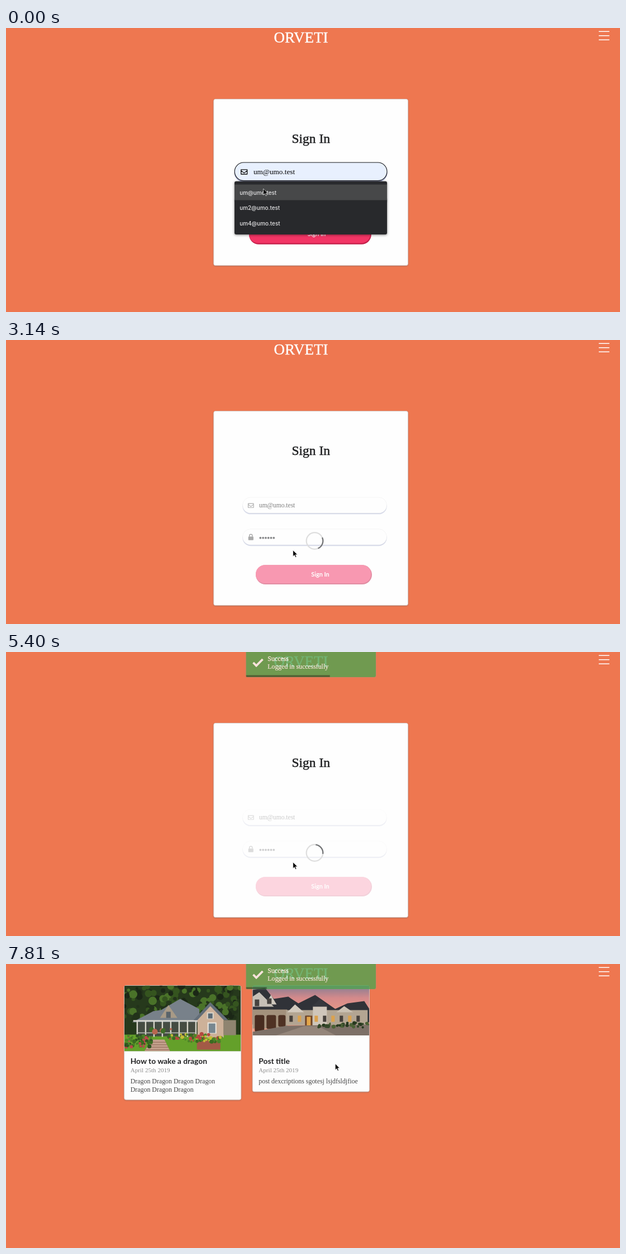
Animation of 1099x509 px, one loop 8000 ms. Source, as an HTML page:

```html
<!DOCTYPE html>
<html lang="en">
<head>
<meta charset="utf-8">
<title>Sign in</title>
<style>
html, body { margin: 0; width: 100%; height: 100%; overflow: hidden; background: #ee7750; }
svg { display: block; width: 1099px; height: 509px; }
text { white-space: pre; }
.serif { font-family: "Liberation Serif", serif; }
.lato { font-family: Lato, sans-serif; font-weight: 700; }
.ui { font-family: Inter, sans-serif; }
.mid { text-anchor: middle; }
.card { stroke: #d4d4d5; stroke-width: .8px; filter: drop-shadow(0 1px 1px rgba(120, 100, 95, .5)); }
.field { filter: drop-shadow(0 2.2px .6px rgba(95, 110, 170, .55)); }
.menu { filter: drop-shadow(0 1px 2px rgba(0, 0, 0, .5)); }
.toast { filter: drop-shadow(0 0 1.5px rgba(153, 153, 153, .6)); }
</style>
</head>
<body>
<svg id="stage" viewBox="0 0 1099 509"></svg>
<script>
const LOOP = 8000;
const STEPS = [0, 140, 310, 460, 610, 760, 1050, 1200, 1500, 1650, 1800, 1940, 2240, 2390, 2540, 2690,
  2990, 3140, 3290, 3430, 3580, 3730, 3880, 4060, 4210, 4360, 4510, 4660, 4810, 4960, 5110, 5250, 5400,
  5550, 5700, 5850, 6000, 6140, 6290, 6440, 6590, 6740, 6950, 7250, 7480, 7810];
const SUBMIT = 2990, TOAST = 3730, FETCH = 6740, POSTS = 7480;
const MAIL = 'um@umo.test';

const range = n => [...Array(n).keys()];
const repeat = (n, draw) => range(n).map(draw).join('');
const clamp = v => Math.max(0, Math.min(1, v));

// Linear interpolation through [time, value] points
function track(points, t) {
  let i = 1;
  while (i < points.length - 1 && t > points[i][0]) i++;
  const [t0, a] = points[i - 1], [t1, b] = points[i];
  return a + (b - a) * clamp((t - t0) / (t1 - t0));
}

function seeded(seed) {
  return () => (seed = seed * 16807 % 2147483647) / 2147483647;
}

const text = (cls, x, y, size, fill, str, extra = '') =>
  `<text class="${cls}" x="${x}" y="${y}" font-size="${size}" fill="${fill}" ${extra}>${str}</text>`;
const rect = (x, y, w, h, fill, r = 0, extra = '') =>
  `<rect x="${x}" y="${y}" width="${w}" height="${h}" rx="${r}" fill="${fill}" ${extra}/>`;
const circle = (x, y, r, fill, extra = '') =>
  `<circle cx="${x}" cy="${y}" r="${r}" fill="${fill}" ${extra}/>`;
const poly = (points, fill) => `<polygon points="${points}" fill="${fill}"/>`;
const path = (d, fill, extra = '') => `<path d="${d}" fill="${fill}" ${extra}/>`;
const group = (attrs, body) => `<g ${attrs}>${body}</g>`;
const move = (x, y, body) => group(`transform="translate(${x} ${y})"`, body);

function header() {
  return text('serif mid', 528, 25.5, 27, '#fff', 'ORVETI', 'stroke="#fff" stroke-width=".4"') +
    path('M1061 6.3h19M1061 13.8h19M1061 21.2h19', 'none', 'stroke="#fff" stroke-width="1.6"');
}

const envelope =
  path('M-5.5-4h11v8.2h-11zM-5.5-2l5.5 4 5.5-4', 'none', 'stroke="#111" stroke-width="1.3" stroke-linejoin="round"');
const lock = rect(-5.3, -1.2, 10.6, 7.4, '#111', 1.2) +
  path('M-3-1v-2a3 3 0 0 1 6 0v2', 'none', 'stroke="#111" stroke-width="1.6"');

const FOCUSED = { border: '#15161a', iconOpacity: 1 };
const BLURRED = { border: 'rgba(34,36,38,.2)', iconOpacity: .5 };
const DISABLED = { border: 'rgba(34,36,38,.08)', iconOpacity: .7 };

function field(x, y, w, scale, fill, icon, look, content) {
  return move(x, y, group(`transform="scale(${scale})"`,
    rect(0, 0, w / scale, 32.6, fill, 16.3, `class="field" stroke="${look.border}" stroke-width="1.1"`) +
    move(17, 16.8, group(`opacity="${look.iconOpacity}"`, icon)) + content));
}

const mailText = text('serif', 33.8, 21, 13.2, '#000', MAIL);
const dots = n => repeat(n, i => circle(36.6 + i * 5.5, 18.2, 2.2, '#15161a'));
const caret = n => rect(34.6 + n * 5.5, 10.5, 1, 13, '#222');

function button(x, y, w) {
  return rect(x, y, w, 34.8, '#c41f4a', 17.4) +
    rect(x, y, w - 1.6, 32.6, '#f23565', 16.3) +
    text('lato mid', x + w / 2 + 11.5, y + 20.3, 10.9, '#fff', 'Sign In');
}

function mailMenu() {
  const rows = [MAIL, 'um2@umo.test', 'um4@umo.test'];
  return group('class="menu"', rect(409, 274.7, 273, 95.3, '#28292c', 3)) +
    rect(409, 280.5, 273, 28, '#474849') +
    rows.map((row, i) => text('ui', 418.3, 298.6 + i * 27.8, 9.9, '#e6e6e7', row, 'font-weight="500"')).join('');
}

function passwordMenu() {
  return group('class="menu"', rect(409, 326.3, 273, 71.7, '#333638', 3)) +
    rect(409, 326.3, 273, 39.3, '#28292b', 3) + circle(424.5, 346.3, 5, '#4fb9d6') +
    text('ui', 436.5, 350, 9.7, '#9d9ea0', 'No username') +
    text('ui', 418.3, 386.5, 9.6, '#9d9ea0', 'Manage passwords…') +
    repeat(14, i => circle(610.8 + i * 4.65, 347.3, 1.8, '#a0a1a3'));
}

function panel(height) {
  return rect(371.8, 127.6, 347.6, height, '#fefefe', 3, 'class="card"') +
    text('serif mid', 545.7, 206, 23.5, '#1e1f21', 'Sign In', 'stroke="#1e1f21" stroke-width=".5"');
}

function signIn(t) {
  const [mailLook, passwordLook] = t < 610 ? [FOCUSED, BLURRED] : [BLURRED, FOCUSED];
  const cleared = t >= 1200;
  const typed = STEPS.filter(s => s >= 1500 && s <= 2390 && s <= t).length;
  const count = cleared ? typed : 14;
  const selection = t >= 1050 && !cleared ? rect(33.5, 9.5, 77, 16, '#b3d4fc') : '';
  const secret = selection + dots(count) + (cleared ? caret(count) : '');
  return panel(298) +
    field(409.2, 241, 272.8, 1, '#e8f0fe', envelope, mailLook, mailText) +
    field(409.2, 292.5, 272.8, 1, cleared ? '#fff' : '#e8f0fe', lock, passwordLook, secret) +
    button(435, 353, 218.8) +
    (t < 140 ? mailMenu() : '') +
    (t >= 760 && t < 1500 ? passwordMenu() : '');
}

function loadingForm(t) {
  const opacity = track([[2900, 1], [3290, .2]], t);
  const angle = 20 + (t - 3580) / 589 * 360;
  const r = 14.8, a = r * Math.SQRT1_2;
  return panel(348) +
    group(`opacity="${opacity}"`,
      field(423.5, 282, 258, .87, '#fefefe', envelope, DISABLED, mailText) +
      field(423.5, 338.8, 258, .87, '#fefefe', lock, DISABLED, dots(6)) +
      button(447, 403.3, 208)) +
    move(552.5, 360, circle(0, 0, r, 'none', 'stroke="#dedede" stroke-width="2.2"') +
      path(`M${-a} ${-a}A${r} ${r} 0 0 1 ${a} ${-a}`, 'none',
        `stroke="#737476" stroke-width="2.2" transform="rotate(${angle})"`));
}

function loader(t) {
  const s = (t - FETCH) / 1000;
  const ring = (r, width, dash, angle) => circle(0, 0, r, 'none',
    `stroke="#fff" stroke-width="${width}" stroke-dasharray="${dash}" transform="rotate(${angle})"`);
  const bars = repeat(5, i => {
    const phase = s - (i + 1) * .1;
    const dy = phase < 0 ? 0 : 5 - 10 * (1 - Math.abs(1 - 2 * (phase % 1)));
    return rect(-20 + i * 10, -15 + dy, 5, 30, '#fff');
  });
  return move(524, 243.8, group('transform="scale(.77)"',
    ring(47, 6, 14.2472, s * 72) + ring(39, 1.3, 10.0472, -s * 72) + bars));
}

function speckle(n, seed, x, y, w, h, r, colors) {
  const rnd = seeded(seed);
  return repeat(n, i => circle((x + rnd() * w).toFixed(1), (y + rnd() * h).toFixed(1),
    (r * (.5 + rnd())).toFixed(1), colors[i % colors.length]));
}

const cottage =
  rect(0, 0, 209, 118, '#26391c') +
  speckle(130, 7, 0, 0, 209, 60, 5, ['#35541f', '#22321a', '#4a7229', '#1b2716']) +
  rect(0, 88, 209, 30, '#64a02a') +
  poly('14,66 52,46 66,44 100,24 134,42 136,66', '#78818a') +
  poly('64,58 79,35 95,58', '#a89a86') + rect(75, 47, 8, 11, '#59636a') +
  rect(22, 66, 108, 25, '#454c42') +
  repeat(8, i => rect(22 + i * 15, 63, 2.4, 29, '#d8d6cb')) +
  rect(16, 62, 118, 2.6, '#d9d8cf') + rect(22, 84, 105, 1.6, '#b9bcb2') +
  poly('124,62 154,30 186,62', '#626d78') +
  poly('131,62 154,37 178,62 178,93 131,93', '#cdb199') +
  rect(148, 48, 12, 12, '#dcd6cb') + rect(150, 50, 8, 9, '#5b6a75') +
  rect(149, 66, 16, 20, '#ebe7df') + rect(151, 68, 12, 17, '#788790') +
  rect(178, 62, 22, 27, '#8f8470') +
  poly('49,97 72,97 82,118 36,118', '#c4a08c') +
  repeat(4, i => rect(46 - i * 3, 101 + i * 4.5, 29 + i * 5, 1.2, '#97705f')) +
  path('M130 102q22-8 42 0v13h-42z', '#a35a46') +
  speckle(70, 21, 2, 90, 46, 20, 2.4, ['#3a6b20', '#b8484a', '#4c8228', '#2f5420']) +
  speckle(70, 33, 80, 87, 94, 14, 2.4, ['#3a6b20', '#c4bb38', '#4c8228', '#b5483f']) +
  speckle(7, 9, 49, 78, 45, 6, 3.5, ['#3f6c28', '#b8664f']);

const manor =
  rect(0, 0, 209, 90, 'url(#dusk)') +
  poly('0,30 0,8 22,4 38,24 64,20 82,32 112,17 148,42 170,32 200,28 209,42 209,66 0,70', '#303238') +
  poly('0,38 0,20 12,12 38,38', '#c6bfb6') + poly('23,34 33,17 43,34', '#cfc8be') +
  rect(0, 43, 62, 34, '#a3917c') + rect(60, 44, 146, 27, '#b3a592') +
  rect(108, 36, 25, 36, '#cfc6ba') + poly('106,38 121,24 135,38', '#36383e') +
  poly('62,48 76,34 92,48', '#d3cabe') + poly('150,48 164,37 180,48', '#cbc1b3') +
  rect(4, 53, 17, 30, '#482c20', 3) + rect(25, 53, 17, 25, '#4f3224', 3) + rect(46, 53, 13, 21, '#4f3224', 3) +
  repeat(9, i => rect(66 + i * 15, 54, 6, 11, i % 2 ? '#dba24e' : '#46403b')) +
  rect(94, 54, 13, 18, '#6f4529') + rect(97, 56, 7, 16, '#e3a64a') +
  rect(26, 23, 8, 10, '#46423f') + rect(4, 25, 8, 12, '#46423f') +
  poly('0,83 62,72 209,70 209,90 0,90', '#7d7067') +
  poly('40,90 92,73 118,73 150,90', '#94857a') +
  speckle(40, 15, 118, 67, 90, 8, 2.4, ['#35482a', '#4c6235', '#28391f']);

const defs = `<defs>
  <linearGradient id="dusk" x2="0" y2="1">
    <stop stop-color="#857c92"/><stop offset=".25" stop-color="#d58a8b"/><stop offset=".6" stop-color="#eb9c85"/>
  </linearGradient>
  <clipPath id="photoA"><path d="M0 118V3a3 3 0 0 1 3-3h202.500a3 3 0 0 1 3 3v115z"/></clipPath>
  <clipPath id="photoB"><path d="M0 89.500V3a3 3 0 0 1 3-3h203a3 3 0 0 1 3 3v86.500z"/></clipPath>
</defs>`;

function post(x, height, clip, photo, title, lines, opacity) {
  return move(x, 38.6,
    rect(0, 0, 209, height, '#fdfdfd', 3, 'class="card"') +
    group(`clip-path="url(#${clip})" opacity="${opacity}"`, photo) +
    text('lato', 11, 140.2, 13.8, '#202122', title) +
    text('serif', 11, 155.5, 11.1, '#8f8f8f', 'April 25th 2019') +
    lines.map((line, i) => text('serif', 11, 175.6 + i * 14.8, 11.9, '#444', line)).join(''));
}

function posts(t) {
  const opacity = t < 7810 ? .6 : 1;
  return post(211.7, 204.6, 'photoA', cottage, 'How to wake a dragon',
    ['Dragon Dragon Dragon Dragon', 'Dragon Dragon Dragon'], opacity) +
    post(441.3, 190.2, 'photoB', manor, 'Post title',
      ['post dexcriptions sgotesj lsjdfsldjfioe'], opacity);
}

function toast(t) {
  const width = track([[3650, 232], [4960, 171], [5400, 150], [6740, 94], [7810, 37]], t);
  const entering = t < 3880;
  return group(`class="toast" opacity="${entering ? .5 : .8}" transform="translate(0 ${entering ? -20 : 0})"`,
    rect(429.7, -20, 232.3, 65, '#51a351', 3) +
    path('M442.500 19l5.500 5.500 11.500-11.500', 'none', 'stroke="#fff" stroke-width="3.800"') +
    text('serif', 468.3, 16, 11.9, '#fff', 'Success', 'stroke="#fff" stroke-width=".3"') +
    text('serif', 468.3, 30.3, 11.8, '#fff', 'Logged in successfully', 'stroke="#fff" stroke-width=".2"') +
    rect(429.7, 41.5, width, 3.3, 'rgba(0,0,0,.45)'));
}

function statusBar() {
  return rect(-5, 501.3, 365, 14, '#2b2d31', 4) +
    text('ui', -9, 513, 9.2, '#b4b5b8', 'Waiting for techsuperb.biz...');
}

function pointer(t) {
  const x = track([[0, 460.6], [610, 463], [2390, 463], [2690, 513.7], [7250, 513.7], [7480, 556], [7810, 589.3]], t);
  const y = track([[0, 288], [610, 307], [2390, 307], [2690, 376.7], [7250, 376.7], [7480, 268], [7810, 178.7]], t);
  const beam = t >= 460 && t < 2540;
  return move(x, y, beam
    ? path('M-2.500-6q2 0 2.500 1.500q.5-1.500 2.500-1.500M0-5V5M-2.500 6.500q2 0 2.500-1.500q.5 1.500 2.500 1.500M-1.500 1h3', 'none',
      'stroke="#222" stroke-width="1"')
    : path('M0 0V11.200L2.600 8.800L4.400 12.800L6.200 12L4.500 8.100H8Z', '#000', 'stroke="#fff" stroke-width=".7"'));
}

function scene(t) {
  const page = t < SUBMIT ? signIn : t < FETCH ? loadingForm : t < POSTS ? loader : posts;
  return defs + rect(0, 0, 1099, 509, '#ee7750') + header() + page(t) +
    (t >= TOAST ? toast(t) : '') +
    (t >= FETCH && t < 7250 ? statusBar() : '') + pointer(t);
}

const stage = document.getElementById('stage');
const start = performance.now();
let shown = -1;

function update() {
  const now = (performance.now() - start) % LOOP;
  const step = STEPS.filter(s => s <= now).pop() ?? 0;
  if (step !== shown) {
    shown = step;
    stage.innerHTML = scene(step);
  }
  requestAnimationFrame(update);
}
update();
</script>
</body>
</html>
```
